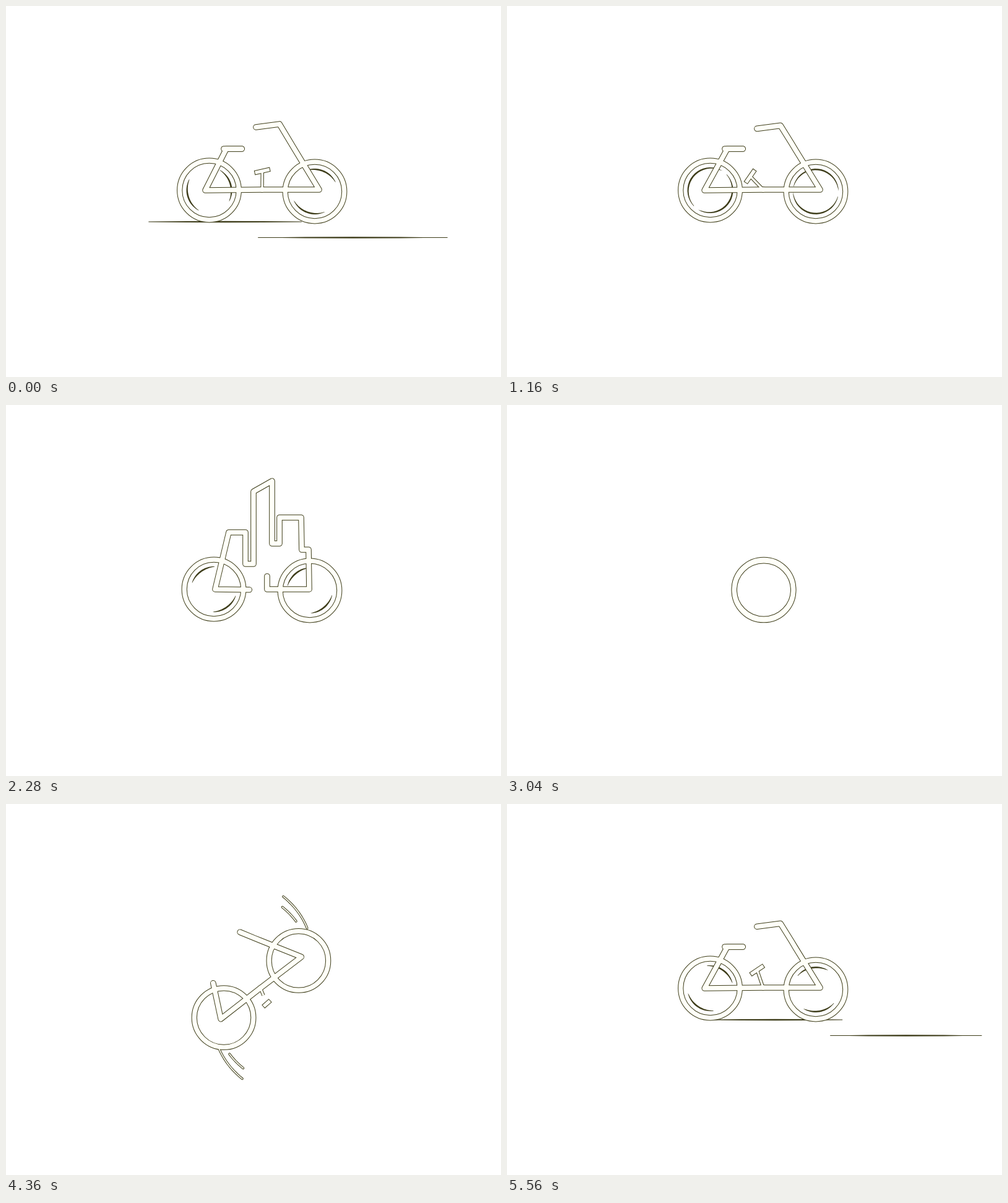
Animation of 800 by 600 pixels, one loop 5.6 s. Source, as an HTML page with a canvas:

```html
<!DOCTYPE html>
<html lang="en">
<head>
<meta charset="utf-8">
<title>Bicycle</title>
<style>
  html, body { margin: 0; width: 100%; height: 100%; overflow: hidden; background: #fff; }
  canvas { display: block; width: 800px; height: 600px; }
</style>
</head>
<body>
<canvas id="stage" width="800" height="600"></canvas>
<script>
const ctx = document.getElementById('stage').getContext('2d');
const LOOP = 5600, DEG = Math.PI / 180;
const INK = '#3e3d1a', CREAM = '#fffff8';
const HUB = [414, 297];

// Each half runs from the crank outwards; matching points morph bike into skyline.
const SEAT = [381, 231], GRIP = [404, 196];
const BIKE_L = [HUB, [322, 298], [356, 231], SEAT, SEAT, SEAT, SEAT, SEAT];
const CITY_L = [[414, 299], [338, 298], [360, 206], [387, 206], [387, 257], [400, 257], [400, 140], [430, 123]];
const BIKE_R = [HUB, HUB, [506, 297], [466, 231], [460, 221], [442, 191], GRIP, GRIP, GRIP, GRIP];
const CITY_R = [[422, 277], [422, 298], [490, 298], [489, 234], [478, 234], [477, 182], [442, 182], [442, 224], [430, 224], [430, 123]];
const SKYLINE = [...CITY_L, ...[...CITY_R].reverse()];

const clamp = x => Math.max(0, Math.min(1, x));
const mix = (a, b, k) => a + (b - a) * k;
const sine = x => (1 - Math.cos(Math.PI * clamp(x))) / 2;
const span = (t, a, b) => clamp((t - a) / (b - a));
const backOut = x => 1 + 1.9 * (x - 1) ** 3 + 0.9 * (x - 1) ** 2;
const polar = (c, r, deg) => [c[0] + r * Math.cos(deg * DEG), c[1] + r * Math.sin(deg * DEG)];

// Eased value through [time, value] stops.
function keys(t, stops) {
  if (t <= stops[0][0]) return stops[0][1];
  for (let i = 1; i < stops.length; i++) {
    const [a, v] = stops[i - 1], [b, w] = stops[i];
    if (t < b) return mix(v, w, sine((t - a) / (b - a)));
  }
  return stops[stops.length - 1][1];
}

// The part of a polyline between two fractions of its length.
function trim(pts, from, to) {
  const dist = (a, b) => Math.hypot(b[0] - a[0], b[1] - a[1]);
  let total = 0, at = 0;
  for (let i = 1; i < pts.length; i++) total += dist(pts[i - 1], pts[i]);
  const lo = from * total, hi = to * total, out = [];
  for (let i = 1; i < pts.length; i++) {
    const a = pts[i - 1], b = pts[i], len = dist(a, b);
    if (len && at + len >= lo && at <= hi) {
      const cut = d => {
        const k = clamp((d - at) / len);
        return [mix(a[0], b[0], k), mix(a[1], b[1], k)];
      };
      if (!out.length) out.push(cut(lo));
      out.push(cut(hi));
    }
    at += len;
  }
  return out;
}

function polyline(pts) {
  const path = new Path2D();
  pts.forEach(p => path.lineTo(p[0], p[1]));
  return path;
}

// All tubes share one outline, so crossings stay open; "edge" is a longer path for square ends.
function drawTubes(tubes) {
  ctx.lineJoin = 'round';
  for (const [color, inset] of [[INK, 0], [CREAM, 2]]) {
    ctx.strokeStyle = color;
    for (const { path, edge, width, cap } of tubes) {
      ctx.lineCap = cap || 'round';
      ctx.lineWidth = width - inset;
      ctx.stroke(inset ? path : edge || path);
    }
  }
}

function streak(from, length, y, head, tail) {
  const a = from - length * head, b = from - length * tail;
  if (b - a < 1) return;
  const mid = (a + b) / 2;
  ctx.fillRect(a, y - 0.5, b - a, 1);
  ctx.beginPath();
  ctx.moveTo(a, y);
  ctx.quadraticCurveTo(mid, y - 2.4, b, y);
  ctx.quadraticCurveTo(mid, y + 2.4, a, y);
  ctx.fill();
}

function drawRoad(u) {
  for (const [start, y] of [[-240, 349], [150, 351], [605, 350.5], [1490, 350.5]]) {
    const p = u - start;
    streak(704, 579, y, sine(p / 335), sine((p - 12) / 533));
  }
  for (const start of [-190, 440, 1690]) {
    const p = u - start;
    streak(800, 579, 374.5, sine(p / 310), sine((p - 90) / 400));
  }
}

function crescent(c, angle, half) {
  ctx.beginPath();
  for (let i = 0; i <= 40; i++) {
    const k = i <= 20 ? i / 20 : (40 - i) / 20;
    const r = i <= 20 ? 37 : 36.4 - 2 * Math.sin(Math.PI * k);
    ctx.lineTo(...polar(c, r, angle + half * (2 * k - 1)));
  }
  ctx.fill();
}

function drawGlints(u, left, right) {
  const wave = Math.sin(Math.PI * u / 1700);
  const half = Math.max(38, 46 + 44 * (u > 1700 ? -1 : wave)) * span(u, -800, -450) * (1 - span(u, 2330, 2500));
  if (half < 1) return;
  for (const turn of [0, 180]) {
    crescent(left, 163 + 0.9785 * u + turn, half);
    crescent(right, 110 + 0.763 * u + turn, half);
  }
}

function wheelPair(t, m) {
  let left = [mix(328.5, 336, m), 298], right = [mix(499, 491, m), 300];
  let tall = 0, angle = 0, radius = 84, center = [414, 299.5];
  if (t >= 2400 && t < 3020) {
    left = [keys(t, [[2400, 336], [2580, 292], [3000, 415]]), 299];
    right = [keys(t, [[2500, 491], [3000, 415]]), 299];
  } else if (t >= 3020 && t < 3640) {
    const gap = keys(t, [[3020, 0], [3320, 67], [3500, 60], [3640, 62]]);
    left = [415, 299 + gap];
    right = [415, 299 - gap];
    tall = keys(t, [[3020, 0], [3200, 5], [3400, 1], [3640, 4]]);
  } else if (t >= 3640 && t < 4640) {
    const p = (t - 3640) / 1000;
    angle = -90 + 450 * (1 - (1 - p) ** 1.95);
    radius = keys(t, [[3640, 62], [3900, 92], [4120, 90], [4360, 76], [4600, 84]]);
    center = [keys(t, [[3640, 415], [4360, 412.5], [4600, 414]]), 299.5];
    left = polar(center, radius, angle + 180);
    right = polar(center, radius, angle);
    tall = 4 * (1 - span(t, 3640, 3800));
  }
  return { left, right, tall, angle, radius, center };
}

function trailTubes(t, { angle, radius }) {
  const k = span(t, 3680, 3860) * (1 - span(t, 4380, 4500));
  if (k <= 0) return [];
  const tubes = [];
  for (const turn of [0, 180]) {
    for (const [near, far, lift] of [[-16, -40, 75], [-26, -39, 58]]) {
      const pts = [];
      for (let i = 0; i <= 12; i++) {
        const q = k * i / 12;
        pts.push(polar([415, 297], radius + mix(44, lift, q), angle + turn + mix(near, far, q)));
      }
      tubes.push({ path: polyline(pts), width: 3.8 });
    }
  }
  return tubes;
}

function bikeTubes(u, m, grow, place) {
  const bob = -3.3 * Math.sin(2 * Math.PI * u / 320) * (1 - clamp(m)) * grow;
  const blend = (a, b) => a.map((p, i) => [mix(p[0], b[i][0], m), mix(p[1], b[i][1], m)]);
  const L = blend(BIKE_L, CITY_L), R = blend(BIKE_R, CITY_R);
  L[1][0] -= 1.2 * bob;
  R.forEach((p, i) => { p[1] += bob * (i > 4 ? 1 : i > 2 ? 0.5 : 0); });
  const line = pts => polyline(pts.map(place));
  const tubes = [
    { path: line(trim(L, 0, grow)), width: 9.6 },
    { path: line(trim(R, 0, grow)), width: 9.6 }
  ];
  if (grow > 0.95 && m < 0.4) tubes.push({ path: line([[352, 231], SEAT]), width: 9.6 });

  const size = clamp(1 - 2 * m);
  if (size > 0) {
    const th = -90 + 0.487 * u + (u < 0 ? 5.1e-5 : 8.2e-5) * u * u;
    const tilt = -4 - 51 * Math.max(0, Math.cos((th - 225) * DEG)) ** 5;
    const half = 12 * size * clamp(2.4 * grow - 1.35);
    const reach = 29 * size * clamp((grow - 0.65) / 0.35);
    const foot = polar(HUB, 30 * size, th);
    const bar = r => line([polar(foot, r, tilt + 180), polar(foot, r, tilt)]);
    if (reach > 0) tubes.push({ path: line([HUB, polar(HUB, reach, th)]), width: 5.4, cap: 'butt' });
    if (half > 0) tubes.push({ path: bar(half), edge: bar(half + 1), width: 7.6, cap: 'butt' });
  }
  return tubes;
}

function draw(t) {
  const u = t > 4000 ? t - LOOP : t;
  const m = t < 4000 ? backOut(span(t, 1480, 1840)) * (t > 1480) : 0;
  const wheels = wheelPair(t, m);
  const { left, right, tall, angle, radius, center } = wheels;

  ctx.fillStyle = '#fff';
  ctx.fillRect(0, 0, 800, 600);
  ctx.fillStyle = INK;
  drawRoad(u);
  drawGlints(u, left, right);

  const tubes = trailTubes(t, wheels);
  for (const c of [left, right]) {
    const ring = new Path2D();
    ring.ellipse(c[0], c[1], 47.8, 47.8 + tall, 0, 0, 2 * Math.PI);
    tubes.push({ path: ring, width: 9.2 });
  }

  if (t < 1840) {
    tubes.push(...bikeTubes(u, m, 1, p => p));
  } else if (t < 2740) {
    const a = 0.5 * sine((t - 2200) / 560), b = 1 - 0.5 * sine((t - 2300) / 460);
    if (b - a > 0.005) tubes.push({ path: polyline(trim(SKYLINE, a, b)), width: 9.6 });
  } else if (t > 4180) {
    const grow = Math.sin(Math.PI / 2 * span(t, 4180, 4475));
    const s = radius / 84, cos = Math.cos(angle * DEG) * s, sin = Math.sin(angle * DEG) * s;
    const place = ([x, y]) => {
      const dx = x - 414, dy = y - 299.5;
      return [center[0] + dx * cos - dy * sin, center[1] + dx * sin + dy * cos];
    };
    tubes.push(...bikeTubes(u, 0, grow, place));
  }
  drawTubes(tubes);
}

const begin = performance.now();
function tick() {
  draw((performance.now() - begin) % LOOP);
  requestAnimationFrame(tick);
}
tick();
</script>
</body>
</html>
```
